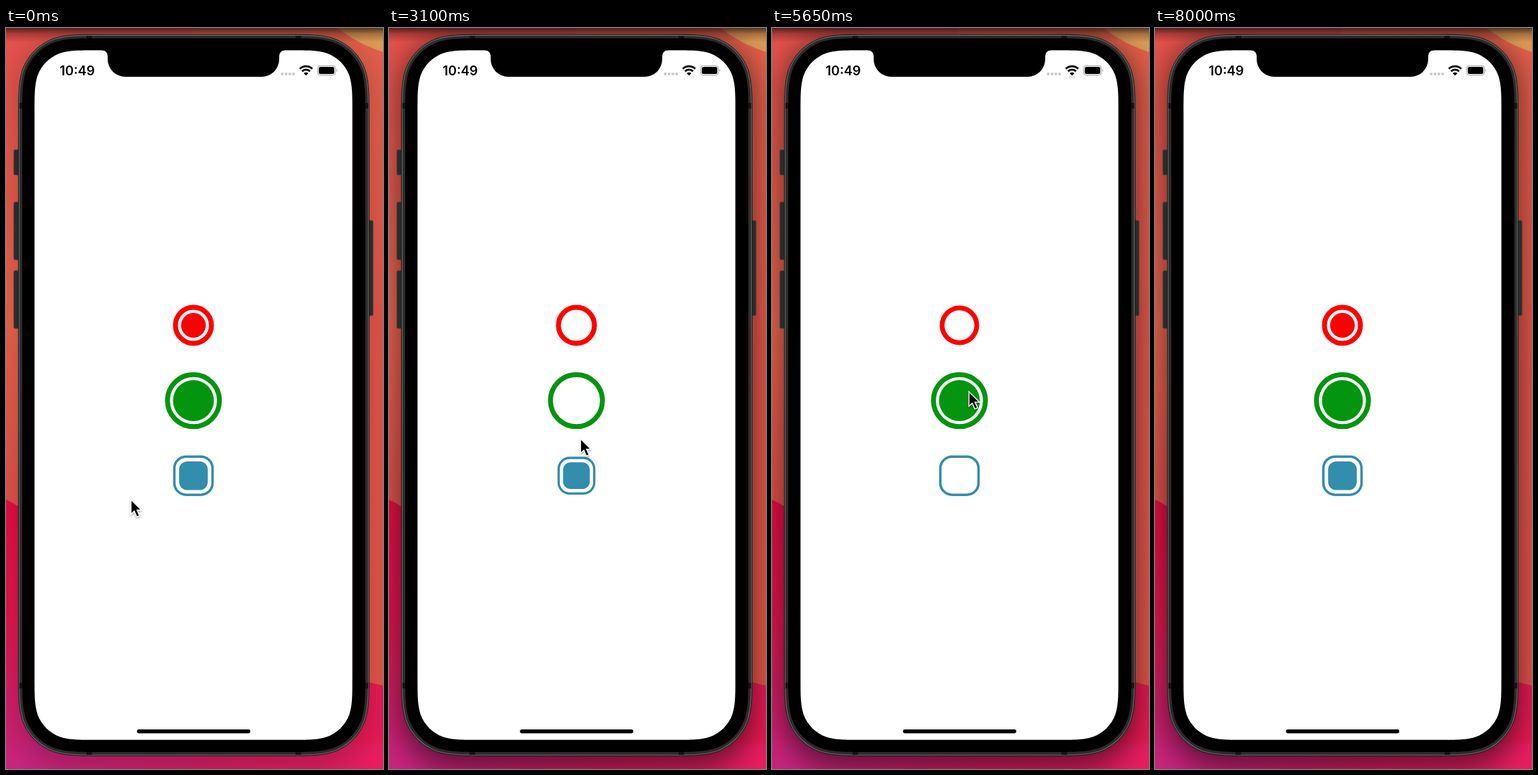
An HTML page that plays this animation: 534x1048 px, repeating every 9250 ms.

```html
<!DOCTYPE html>
<html lang="en">
<head>
<meta charset="utf-8">
<title>Radio buttons</title>
<style>
  html, body { margin: 0; width: 100%; height: 100%; overflow: hidden; background: #e2514a; }
  svg { display: block; width: 100vw; height: 100vh; }
  text { font: 600 18.4px Inter, "Liberation Sans", sans-serif; }
</style>
</head>
<body>
<svg viewBox="0 0 534 1048" preserveAspectRatio="none">
  <defs>
    <linearGradient id="coral" x2="0" y2="1">
      <stop stop-color="#e5514b"/>
      <stop offset=".6" stop-color="#e9644c"/>
      <stop offset="1" stop-color="#e2504a"/>
    </linearGradient>
    <linearGradient id="coralRight" x2="0" y2="1">
      <stop stop-color="#e4604b"/>
      <stop offset=".5" stop-color="#e4564a"/>
      <stop offset="1" stop-color="#e65549"/>
    </linearGradient>
    <linearGradient id="crimson" x2="0" y2="1">
      <stop stop-color="#e50f43"/>
      <stop offset=".45" stop-color="#e3174f"/>
      <stop offset="1" stop-color="#c9257f"/>
    </linearGradient>
    <linearGradient id="base">
      <stop stop-color="#c9257f"/>
      <stop offset=".5" stop-color="#d41f63"/>
      <stop offset="1" stop-color="#ec1d61"/>
    </linearGradient>
    <linearGradient id="topShade" x2="0" y2="1">
      <stop stop-color="#200c0c" stop-opacity=".72"/>
      <stop offset=".4" stop-color="#200c0c" stop-opacity=".3"/>
      <stop offset="1" stop-color="#200c0c" stop-opacity="0"/>
    </linearGradient>
    <filter id="blur" x="-30%" y="-20%" width="160%" height="140%"><feGaussianBlur stdDeviation="22"/></filter>
    <filter id="soft" x="-50%" y="-50%" width="200%" height="200%">
      <feDropShadow dx="0" dy="1.5" stdDeviation="1.3" flood-opacity=".4"/>
    </filter>
  </defs>

  <!-- wallpaper -->
  <rect width="270" height="700" fill="url(#coral)"/>
  <rect x="264" width="270" height="960" fill="url(#coralRight)"/>
  <path d="M470 0Q497 22 534 34V0Z" fill="#dc9a55"/>
  <path d="M0 667Q9 671 18 677L270 1020V1048H0Z" fill="url(#crimson)"/>
  <path d="M440 900Q505 924 534 930V1048H440Z" fill="#ea1a55"/>
  <rect y="1012" x="20" width="514" height="36" fill="url(#base)"/>
  <rect id="shadow" x="16" y="14" width="500" height="1032" rx="76" filter="url(#blur)"/>
  <rect width="534" height="20" fill="url(#topShade)"/>

  <!-- phone -->
  <g fill="#2b2b2b" stroke="#5a4a48" stroke-width=".8">
    <rect x="11" y="172" width="10" height="36" rx="2"/>
    <rect x="11" y="246" width="10" height="82" rx="2"/>
    <rect x="11" y="343" width="10" height="82" rx="2"/>
    <rect x="510" y="272" width="10" height="135" rx="2"/>
  </g>
  <path data-box="17.7 9.3 496.6 1020 78" fill="#2b2b2b" stroke="#1a1a1a"/>
  <path data-box="18.8 10.4 494.4 1017.8 77" fill="none" stroke="#696969" stroke-width="1.1"/>
  <path d="M118 11V15M118 1024V1028M414 11V15M414 1024V1028M19 110H24M19 930H24M508 110H513M508 930H513" stroke="#151515" stroke-width="8"/>
  <path data-box="23 14.5 486 1009.5 73"/>
  <path data-box="40.4 31.5 450.2 975.2 57" fill="#fff"/>
  <path d="M136 30V31.5A8 8 0 0 1 144 39.5V44A25 25 0 0 0 169 69H362A25 25 0 0 0 387 44V39.5A8 8 0 0 1 395 31.5V30Z"/>
  <rect x="185.5" y="992" width="160.5" height="5.5" rx="2.75"/>

  <!-- status bar -->
  <text x="76" y="66.7">10:49</text>
  <path d="M389.5 65H393M395 65H398.5M400.3 65H403.8M405.6 65H409.1" stroke="#c6c6c6" stroke-width="3.5"/>
  <g fill="none" stroke="#000" stroke-width="2.7">
    <path d="M416.2 57.8A12.5 12.5 0 0 1 433.8 57.8"/>
    <path d="M419.3 61.2A8 8 0 0 1 430.7 61.2"/>
  </g>
  <path d="M425 67.3L421.7 64Q425 61.3 428.3 64Z"/>
  <rect x="441.4" y="53.3" width="25.2" height="13.4" rx="4" fill="none" stroke="#9a9a9a"/>
  <rect x="443" y="55" width="22" height="10" rx="2.5"/>
  <path d="M468 57.8Q470 60 468 62.2Z" fill="#9a9a9a"/>

  <g id="buttons"></g>
  <path id="cursor" d="M0 0V20.5L4.7 16.2L8.2 24.4L12.1 22.7L8.6 14.7H14.8Z"
    stroke="#fff" stroke-width="1.4" filter="url(#soft)"/>
</svg>
<script>
const LOOP = 9250, STEP = 50, FOCUS = 600, HIDE = 7800;
const byId = id => document.getElementById(id);
const shadow = byId('shadow'), cursor = byId('cursor');

// rectangle with smooth, continuous corners
const half = [[0, 1.5287], [0, 1.0885], [0, .8684], [.0749, .6315], [.1691, .3728]];
const corner = [...half, ...half.map(([x, y]) => [y, x]).reverse()];

function smoothRect(x, y, w, h, r) {
  const part = (right, bottom) => {
    const points = corner.map(([u, v]) =>
      [right ? x + w - u * r : x + u * r, bottom ? y + h - v * r : y + v * r].join(' '));
    if (right !== bottom) points.reverse();
    return points[0] + 'C' + points.slice(1).join(' ');
  };
  return 'M' + [part(false, false), part(true, false), part(true, true), part(false, true)].join('L') + 'Z';
}

for (const el of document.querySelectorAll('[data-box]'))
  el.setAttribute('d', smoothRect(...el.dataset.box.split(' ').map(Number)));

// outer size, ring width, ring radius, dot size, dot radius; each tap flips the dot
const specs = [
  { y: 420.5, color: '#ff0000', size: 58, line: 7, round: 29, dot: 35, dotRound: 17.5, taps: [1420, 3703, 5350, 6130] },
  { y: 527, color: '#03950f', size: 80.6, line: 7, round: 40.3, dot: 58, dotRound: 29, taps: [1954, 3350, 4150, 4950, 5750, 6880] },
  { y: 633.2, color: '#338dac', size: 57.6, line: 3.5, round: 18.5, dot: 40.6, dotRound: 11.5, taps: [2420, 2870, 4545, 7220] }
];

const square = (size, rx, attrs) =>
  `<rect x="${-size / 2}" y="${-size / 2}" width="${size}" height="${size}" rx="${rx}" ${attrs}/>`;

byId('buttons').innerHTML = specs.map(s => '<g>' +
  square(s.size - s.line, s.round - s.line / 2, `fill="none" stroke="${s.color}" stroke-width="${s.line}"`) +
  square(s.dot, s.dotRound, `fill="${s.color}"`) + '</g>').join('');
const groups = [...byId('buttons').children];

// pointer path: time, x, y
const path = [
  [0, 177, 667], [50, 177, 667], [450, 232, 520], [600, 232, 520], [1250, 258, 434], [1350, 258, 434],
  [1450, 262, 427], [1954, 262, 530], [2350, 265, 619], [2450, 265, 622], [2870, 268, 626],
  [3350, 275, 530], [3750, 281, 412], [4150, 282, 525], [4545, 282, 626], [4900, 281, 550],
  [4980, 281, 538], [5350, 279, 430], [5750, 279, 530], [6130, 278, 428], [6450, 278, 445],
  [6880, 275, 530], [7220, 272, 630], [7300, 272, 630], [7800, 418, 406]
];

function pointer(t) {
  const i = Math.max(1, path.findIndex(p => p[0] > t));
  const [t0, x0, y0] = path[i - 1], [t1, x1, y1] = path[i];
  const p = (t - t0) / (t1 - t0), e = p * p * (3 - 2 * p);
  return [x0 + (x1 - x0) * e, y0 + (y1 - y0) * e];
}

// quick press, slower release
function pressScale(d) {
  if (d < 100) return 1 - .15 * Math.sin(d / 100 * Math.PI / 2);
  return 1 - .15 * Math.max(0, 1 - (d - 100) / 400) ** 2;
}

function draw(now) {
  const t = Math.floor(now % LOOP / STEP) * STEP;
  shadow.setAttribute('opacity', t < FOCUS ? .22 : .55);
  specs.forEach((s, i) => {
    const done = s.taps.filter(tap => tap <= t);
    const scale = done.length ? pressScale(t - done[done.length - 1]) : 1;
    groups[i].setAttribute('transform', `translate(265.5 ${s.y}) scale(${scale})`);
    groups[i].lastChild.setAttribute('visibility', done.length % 2 ? 'hidden' : 'visible');
  });
  cursor.setAttribute('visibility', t < HIDE ? 'visible' : 'hidden');
  if (t < HIDE) cursor.setAttribute('transform', `translate(${pointer(t).join(' ')})`);
}

const start = performance.now();
function tick() {
  draw(performance.now() - start);
  requestAnimationFrame(tick);
}
tick();
</script>
</body>
</html>
```
